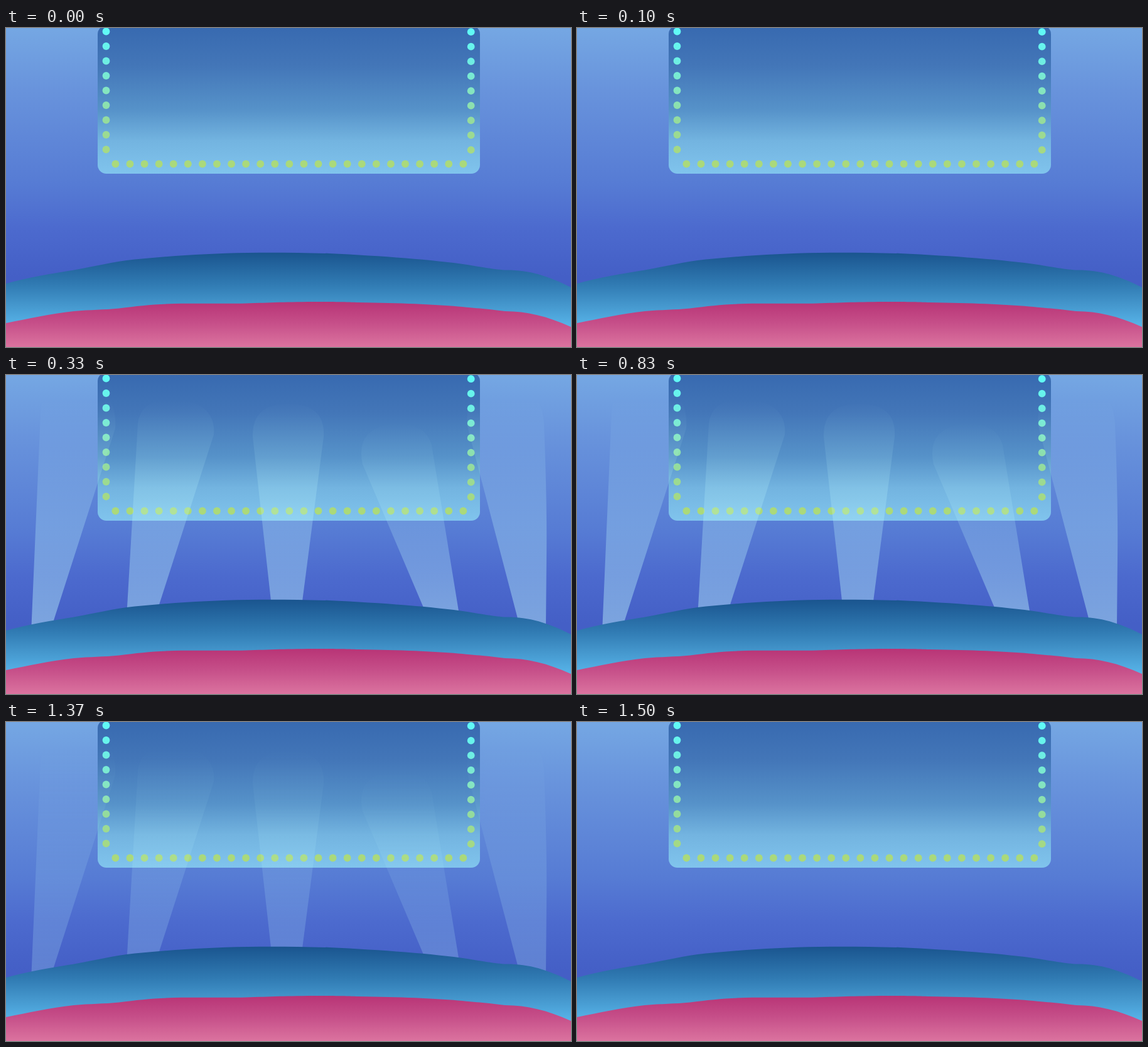
Animation, 900 px wide and 508 px high, one loop 1670 ms. Source, as an HTML page:

```html
<!DOCTYPE html>
<html lang="en">
<head>
<meta charset="utf-8">
<title>Stage lights</title>
<style>
html, body { margin: 0; width: 100%; height: 100%; overflow: hidden; background: #4460c6; }
svg { display: block; width: 100%; height: 100%; }
</style>
</head>
<body>
<svg viewBox="0 0 900 508" preserveAspectRatio="none">
  <defs></defs>
  <rect width="900" height="508" fill="url(#sky)"/>
  <rect x="146" y="-4" width="609" height="236" rx="14" fill="url(#board)"/>
  <g id="dots" fill="url(#bulb)"></g>
  <g id="beams" fill="url(#beam)" opacity="0">
    <path d="M40.5 400 L55 62 Q57 10 115 12 Q178 18 174 85 L73 400Z"/>
    <path d="M192.5 378 L210 78 Q214 38 268 38 Q335 44 331 95 L240 378Z"/>
    <path d="M423 368 L393 98 Q392 46 449 46 Q509 46 506 98 L471 368Z"/>
    <path fill="url(#dim)" d="M670 382 L568 142 Q556 88 612 78 Q668 74 678 112 L722 382Z"/>
    <path d="M818 399 L735 82 Q728 24 790 16 Q855 16 857 80 Q862 200 861 290 L860 399Z"/>
  </g>
  <path fill="url(#hill)" d="M0 407 C35 397 75 391 108 385.500 C145 379 170 372 205 368.500 C260 363 320 359 385 358 C430 357.500 470 358 515 359 C600 363 680 369 735 377 C765 382 778 384 795 385.500 C832 385 862 394 900 413 V508 H0Z"/>
  <path fill="url(#floor)" d="M0 470 C35 463 70 455 108 451 C135 448.500 155 449 180 446.500 C210 442.500 235 440 268 439 C310 438.500 345 439 375 438.800 C415 437.500 440 436.300 490 436 C530 436 545 436.500 560 437 C630 438 680 440 720 443.500 C755 446.500 770 448 795 451 C830 451 862 459 900 476 V508 H0Z"/>
</svg>
<script>
const NS = 'http://www.w3.org/2000/svg';
const $ = s => document.querySelector(s);

function add(parent, tag, attrs) {
  const el = document.createElementNS(NS, tag);
  for (const k in attrs) el.setAttribute(k, attrs[k]);
  return parent.appendChild(el);
}

// Vertical gradient; stops are [y, colour, opacity]
function gradient(id, stops) {
  const top = stops[0][0], bottom = stops[stops.length - 1][0];
  const g = add($('defs'), 'linearGradient',
    { id, gradientUnits: 'userSpaceOnUse', x1: 0, x2: 0, y1: top, y2: bottom });
  for (const [y, color, alpha = 1] of stops)
    add(g, 'stop', { offset: (y - top) / (bottom - top), 'stop-color': color, 'stop-opacity': alpha });
}

gradient('sky', [[0, '#75a7e3'], [100, '#6893dc'], [250, '#567bd4'], [320, '#4c6ace'], [395, '#445fc6']]);
gradient('board', [[0, '#386ab0'], [60, '#4376b8'], [130, '#5692c9'], [180, '#73b4e0'], [232, '#80c4ed']]);
gradient('bulb', [[0, '#5ffbf8'], [52, '#6deee4'], [100, '#84e5c0'], [146, '#94dc9d'], [194, '#a4d985'], [218, '#abd97a']]);
gradient('hill', [[358, '#1a558f'], [410, '#317cb4'], [440, '#4496cc'], [475, '#57b4e9']]);
gradient('floor', [[436, '#b83476'], [470, '#c64f89'], [508, '#db739f']]);

const LIGHT = '#c4ffff';
gradient('beam', [[40, LIGHT, 0], [120, LIGHT, .1], [230, LIGHT, .25], [395, LIGHT, .43]]);
gradient('dim', [[75, LIGHT, 0], [230, LIGHT, .17], [380, LIGHT, .42]]);

const dot = (cx, cy) => add($('#dots'), 'circle', { cx, cy, r: 5.9 });
for (let i = 0; i < 9; i++) {
  dot(159.5, 5.5 + 23.5 * i);
  dot(740.7, 6.2 + 23.5 * i);
}
for (let i = 0; i < 25; i++) dot(174.4 + 23.08 * i, 216.5);

// The lights switch in hard steps: off, half, full, half, off
const LOOP = 1670;
const steps = [[170, 0], [330, .5], [1170, 1], [1500, .5], [LOOP, 0]];
const beams = $('#beams');
const start = performance.now();

function draw(now) {
  const t = Math.max(0, now - start) % LOOP;
  beams.setAttribute('opacity', steps.find(([end]) => t < end)[1]);
  requestAnimationFrame(draw);
}
draw(start);
</script>
</body>
</html>
```
